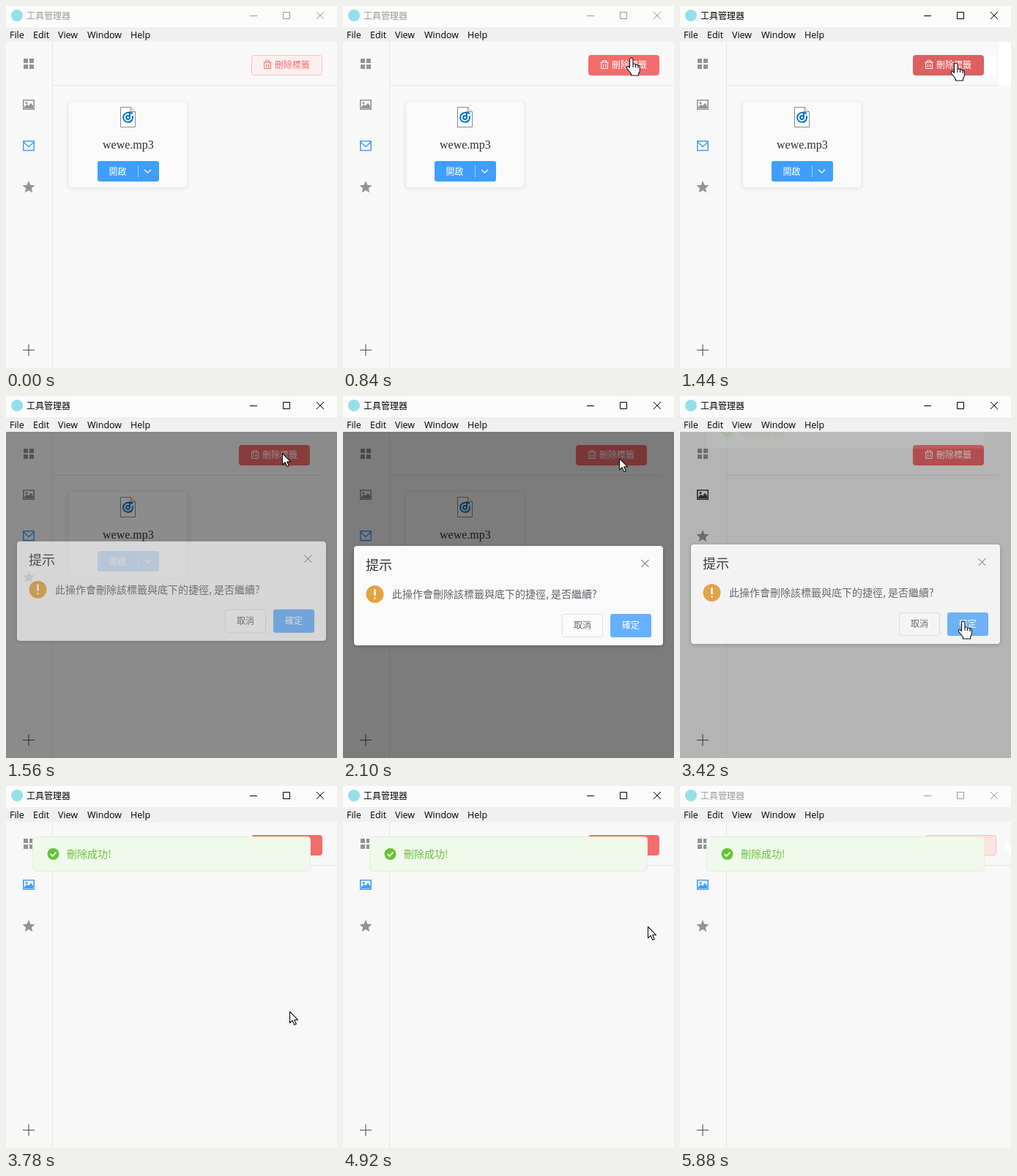
Recreate the animation shown at these times as an HTML page. Size 452 by 495 pixels, loop 5940 ms.

```html
<!DOCTYPE html>
<html lang="zh-Hant">
<head>
<meta charset="utf-8">
<title>工具管理器</title>
<style>
  html, body { margin: 0; width: 100%; height: 100%; overflow: hidden; background: #f9f9f9; }
  svg { display: block; width: 452px; height: 495px; }
  text { font: 12px "Noto Sans CJK TC", "Noto Sans CJK JP", "Noto Sans CJK", sans-serif; }
  .menu text { font: 12.5px "Open Sans", "Noto Sans", sans-serif; }
  .file { font: 16px "Liberation Serif", "Noto Serif", serif; }
  .t14 { font-size: 14px; }
  .t18 { font-size: 18px; }
  .line { fill: none; }
</style>
</head>
<body>
<svg viewBox="0 0 452 495">
  <defs>
    <clipPath id="content"><rect y="49" width="452" height="446"/></clipPath>
    <filter id="soft" x="-20%" y="-20%" width="140%" height="140%"><feGaussianBlur stdDeviation="2.5"/></filter>
  </defs>

  <rect width="452" height="29" fill="#fcfcfc"/>
  <circle cx="15" cy="13" r="8" fill="#94e0ea"/>
  <g id="caption">
    <text x="28" y="18">工具管理器</text>
    <path class="line" stroke="currentColor" d="M333 13.5h10M378.5 8.5h9v9h-9zM424 8l10 10m0-10l-10 10"/>
  </g>
  <g class="menu">
    <rect y="29" width="452" height="20" fill="#f0f0f0"/>
    <text x="5" y="44">File</text><text x="37" y="44">Edit</text><text x="71" y="44">View</text>
    <text x="111" y="44">Window</text><text x="170" y="44">Help</text>
  </g>

  <g clip-path="url(#content)">
    <rect id="page" y="49" width="452" height="446"/>
    <path id="gap" fill="#fff" d="M435 49h17v59h-17zM415 67h17v28h-17z"/>
    <path stroke="#e6e6e6" d="M63.5 49V495"/>
    <path id="rule" stroke="#e6e6e6"/>

    <path fill="#909399" d="M24 72h6v6h-6zM32 72h6v6h-6zM24 80h6v6h-6zM32 80h6v6h-6z"/>
    <g id="picture">
      <path class="line" stroke="currentColor" stroke-width="1.6" d="M23.8 128.8h14.4v12.4H23.8z"/>
      <path fill="currentColor" d="M25 140v-2l3.5-3.5 2.5 2 3-4 3 4v3.5z"/>
      <circle cx="28" cy="132.5" r="1.6" fill="currentColor"/>
    </g>
    <path id="mail" class="line" stroke="#409eff" stroke-width="1.5" d="M23.8 184.8h14.4v12.6H23.8zM24 186l7 6.5 7-6.5"/>
    <path id="star" fill="#909399"/>
    <path stroke="#505256" stroke-width="1.1" d="M23 470.5h16M31 462.5v16"/>

    <g id="card">
      <rect x="85" y="132" width="163" height="117" rx="4" fill="#000" opacity=".12" filter="url(#soft)"/>
      <rect x="85.5" y="130.5" width="162" height="118" rx="4" fill="#fafafa" stroke="#edf0f6"/>
      <path fill="#fff" stroke="#8a8a8a" d="M156.5 138.5h14l6 6v21h-20z"/>
      <path fill="#eee" stroke="#8a8a8a" d="M170.5 138.5v6h6"/>
      <g class="line" stroke="#0a74c9" stroke-width="2">
        <path d="M170 146.8a6.5 6.5 0 1 0 2.7 3.2"/>
        <circle cx="166.5" cy="152.5" r="2.4"/>
        <path d="M169 152v-6.5l4 1.5"/>
      </g>
      <text class="file" x="132" y="195" fill="#303133">wewe.mp3</text>
      <rect x="125" y="212" width="84" height="28" rx="3" fill="#409eff"/>
      <text x="140.5" y="230.5" fill="#fff">開啟</text>
      <path stroke="#a0cfff" d="M180.5 218v16"/>
      <path class="line" stroke="#fff" stroke-width="1.3" d="M189 223.7l4.5 4.5 4.5-4.5"/>
    </g>

    <g id="remove">
      <rect x="335.5" y="67.5" width="96" height="27" rx="3"/>
      <path class="line" stroke="currentColor" d="M351.5 77h11M354.5 77v-2.2h5V77M352.7 77v8.5h8.6V77M355.5 79.5v4M358.5 79.5v4"/>
      <text x="367" y="85.4" fill="currentColor">刪除標籤</text>
    </g>

    <rect id="shade" y="49" width="452" height="446"/>

    <g id="dialog">
      <rect x="15" y="206" width="422" height="136" rx="4" opacity=".25" filter="url(#soft)"/>
      <rect x="15" y="205" width="422" height="136" rx="4" fill="#fafafa"/>
      <text class="t18" x="31" y="237.5" fill="#303133">提示</text>
      <path stroke="#909399" stroke-width="1.2" d="M407.5 224l10 10m0-10l-10 10"/>
      <circle cx="43.5" cy="271" r="12" fill="#e6a23c"/>
      <path stroke="#fff" stroke-width="2.6" stroke-linecap="round" d="M43.5 265v7M43.5 276.5v.2"/>
      <text class="t14" x="67" y="276" fill="#606266">此操作會刪除該標籤與底下的捷徑, 是否繼續?</text>
      <rect x="299.5" y="298.5" width="55" height="31" rx="3" fill="#fcfcfc" stroke="#dcdfe6"/>
      <text x="315" y="318.4" fill="#606266">取消</text>
      <rect id="confirm" x="365" y="298" width="56" height="32" rx="3"/>
      <text x="381" y="318.4" fill="#fff">確定</text>
    </g>

    <g id="message">
      <rect x="36.5" y="69.5" width="379" height="47" rx="4" fill="#f0f9eb" stroke="#e1f3d8"/>
      <circle cx="64.5" cy="93" r="8" fill="#67c23a"/>
      <path class="line" stroke="#fff" stroke-width="1.8" d="M60.8 93.2l2.7 2.7 5-5.2"/>
      <text class="t14" x="83" y="98" fill="#67c23a">刪除成功!</text>
    </g>
  </g>

  <g id="cursor" fill="#fff" stroke="#111" stroke-width="1.1" stroke-linejoin="round">
    <path id="arrow" d="M.5.5V16l3.6-3.4 2.7 6 2.5-1.1-2.6-5.7h5z"/>
    <path id="hand" d="M-2.5 2.5Q-2.5 0-.2 0 2 0 2 2.5V8.5Q4.2 7.3 5.5 9.3 8 8.3 9 10.3 11.3 10 11.3 12.5V17Q11 20 9.5 21.5V24H-.5V21.5Q-4 17.5-6.5 14-7.5 11.5-5 11.5-4 11.5-2.5 13.5ZM2 8.5V13M5.5 9.3V13M9 10.3V14"/>
  </g>
</svg>

<script>
const LOOP = 5940, STEP = 60;
const OPEN = 1440, CLOSE = 3390, UNLOCK = 3690, BLUR = 5820;
const el = {};
document.querySelectorAll('svg [id]').forEach(n => el[n.id] = n);

const set = (id, attrs) => { for (const k in attrs) el[id].setAttribute(k, attrs[k]); };
const show = (id, on) => set(id, { display: on ? 'inline' : 'none' });
const span = (t, start, length) => Math.min(1, Math.max(0, (t - start) / length));
const smooth = p => p * p * (3 - 2 * p);
const easeOut = p => 1 - (1 - p) ** 2;
const lerp = (a, b, p) => a + (b - a) * p;
const mix = (a, b, p) => `rgb(${a.map((v, i) => Math.round(lerp(v, b[i], p)))})`;

// The CSS "ease" curve: cubic-bezier(.25, .1, .25, 1)
function ease(x) {
  if (x <= 0 || x >= 1) return x;
  const bez = (a, b, s) => 3 * a * s * (1 - s) ** 2 + 3 * b * s * s * (1 - s) + s ** 3;
  let lo = 0, hi = 1;
  for (let i = 0; i < 20; i++) {
    const mid = (lo + hi) / 2;
    if (bez(.25, .25, mid) < x) lo = mid; else hi = mid;
  }
  return bez(.1, 1, lo);
}

// Mouse legs: start, length, from, to, easing
const legs = [
  [420, 600, [455, 44], [377, 78], smooth],
  [2040, 600, [377, 79], [379, 283], smooth],
  [2640, 240, [379, 283], [387, 308], easeOut],
  [4620, 600, [387, 308], [444, 75], smooth]
];
function mouse(t) {
  const [start, length, a, b, curve] = legs.filter(l => t >= l[0]).pop() || legs[0];
  const p = curve(span(t, start, length));
  return [lerp(a[0], b[0], p), lerp(a[1], b[1], p)];
}

const points = [];
for (let i = 0; i < 10; i++) {
  const r = i % 2 ? 4 : 9, a = i * Math.PI / 5;
  points.push(`${31 + r * Math.sin(a)} ${248 - r * Math.cos(a)}`);
}
set('star', { d: `M${points.join('L')}Z` });

const WHITE = [255, 255, 255], RED = [245, 108, 108], DARK = [221, 97, 97];
const PALE = [254, 240, 240], EDGE = [251, 196, 196];

function drawRemove(t, x, y, locked) {
  let solid = 0;
  if (t < 2040) solid = t >= 480 && x < 432 ? 1 : 0;
  else if (t < CLOSE) solid = y < 96 ? 1 : 0;
  else solid = 1 - span(t, BLUR - 30, 100);
  const full = t >= 1320 && t < 1500 ? DARK : RED;
  const box = el.remove.firstElementChild;
  box.setAttribute('fill', mix(PALE, full, solid));
  box.setAttribute('stroke', mix(EDGE, full, solid));
  set('remove', { color: mix(RED, WHITE, solid), transform: `translate(${locked ? -17 : 0})` });
}

function draw(t) {
  const closed = t >= CLOSE, locked = t >= OPEN && t < UNLOCK;
  const focused = t >= 1380 && t < BLUR;
  const [x, y] = mouse(t);

  set('caption', { color: focused ? '#000' : '#999', fill: focused ? '#000' : '#999' });
  set('page', { fill: closed ? '#f8f8f8' : '#f9f9f9' });
  set('rule', { d: `M64 108.5H${locked ? 435 : 452}` });
  show('gap', t >= OPEN && t < OPEN + STEP);
  show('card', !closed);
  show('mail', !closed);
  set('star', { transform: `translate(0 ${closed ? -56 : 0})` });
  set('picture', { color: closed ? mix([48, 49, 51], [64, 158, 255], ease(span(t, CLOSE, 300))) : '#909399' });
  drawRemove(t, x, y, locked);

  set('shade', { opacity: .5 * (ease(span(t, OPEN, 200)) - ease(span(t, CLOSE - 24, 200))) });
  const shown = ease(span(t, OPEN, 300)) - ease(span(t, CLOSE, 300));
  set('dialog', { opacity: shown, transform: `translate(0 ${-20 * (1 - shown)})` });
  set('confirm', { fill: t >= 3300 && t < CLOSE ? '#3a8ee6' : '#66b1ff' });
  set('message', {
    opacity: ease(span(t, CLOSE, 300)),
    transform: `translate(0 ${-48 * (1 - ease(span(t, CLOSE, 400)))})`
  });

  const overRemove = t < 1500 && x < 432;
  const overConfirm = t > 2640 && t < UNLOCK && y >= 298;
  const hand = overRemove || overConfirm;
  show('cursor', t >= 480);
  show('hand', hand);
  show('arrow', !hand);
  set('cursor', {
    transform: `translate(${Math.round(x)} ${Math.round(y)})`,
    stroke: t >= 5280 ? '#fff' : '#111'
  });
}

const begin = performance.now();
function tick() {
  const t = (performance.now() - begin) % LOOP;
  draw(Math.floor(t / STEP) * STEP);
  requestAnimationFrame(tick);
}
tick();
</script>
</body>
</html>
```
